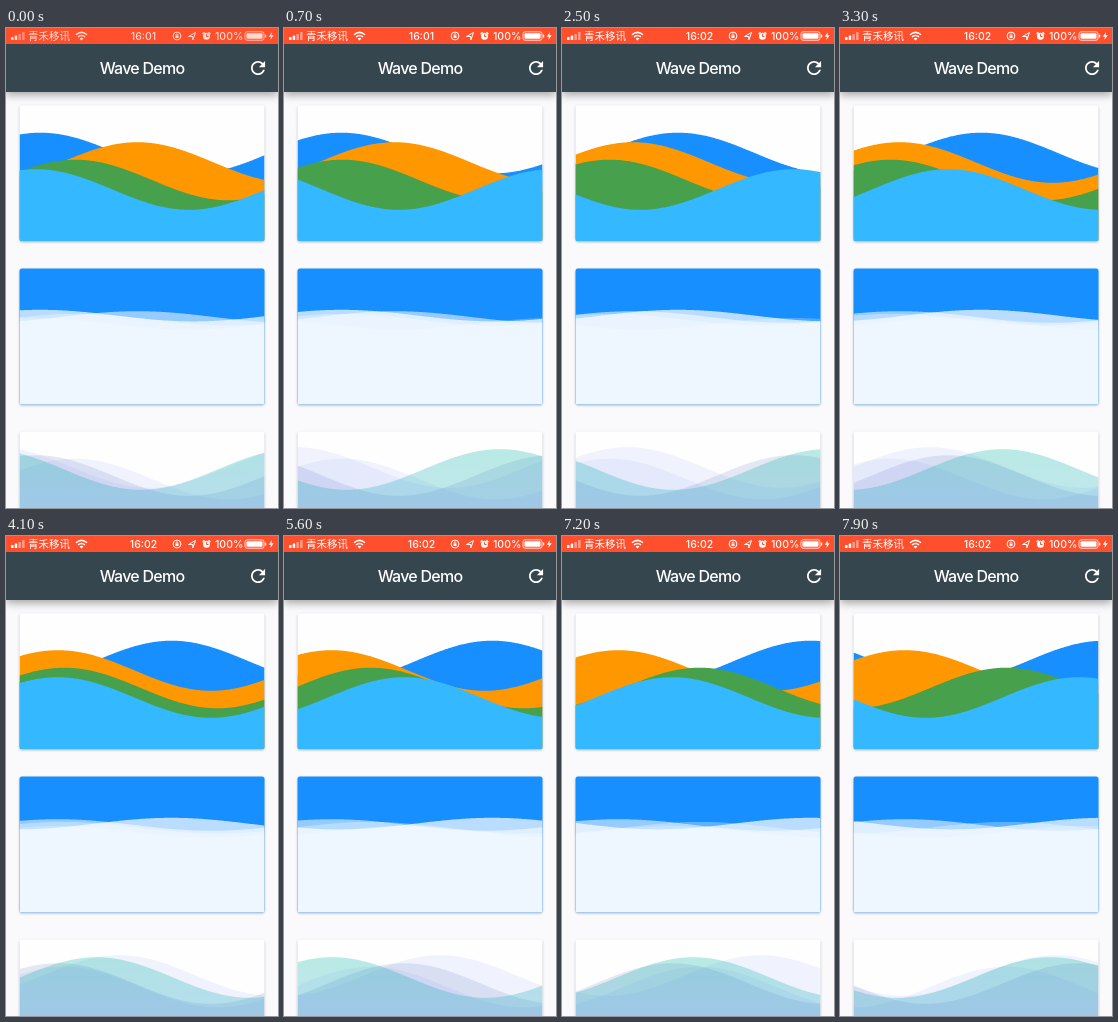
Recreate the animation shown at these times as an HTML page. Size 272 by 480 pixels, loop 8000 ms.

```html
<!DOCTYPE html>
<html lang="en">
<head>
<meta charset="utf-8">
<title>Wave Demo</title>
<style>
html, body { margin: 0; width: 100%; height: 100%; overflow: hidden; background: #fafafc; }
svg { display: block; width: 272px; height: 480px; }
text { fill: #fff; font: 500 10.5px Inter, Roboto, sans-serif; }
.carrier { font: 400 10.5px "Noto Sans CJK SC", "Noto Sans CJK", sans-serif; }
.title { font-size: 16px; letter-spacing: -.75px; }
.card { filter: drop-shadow(0 1px 1px rgba(0,0,0,.25)); }
.bar { filter: drop-shadow(0 3px 4px rgba(0,0,0,.35)); }
.line { fill: none; stroke: #fff; stroke-width: 1; }
</style>
</head>
<body>
<svg viewBox="0 0 272 480">
  <defs>
    <linearGradient id="teal" gradientUnits="userSpaceOnUse" x1="0" y1="422" x2="0" y2="476">
      <stop offset="0" stop-color="#00b4a0"/>
      <stop offset="1" stop-color="#1ea5c3"/>
    </linearGradient>
  </defs>
  <g id="cards"></g>
  <rect class="bar" width="272" height="64" fill="#36464f"/>
  <rect width="272" height="16" fill="#ff4f2c"/>
  <g id="status" fill="#fff">
    <rect x="5" y="9" width="2.5" height="3" rx=".5"/>
    <rect x="8.7" y="7.5" width="2.5" height="4.5" rx=".5"/>
    <rect x="12.4" y="6" width="2.5" height="6" rx=".5" opacity=".45"/>
    <rect x="16.1" y="4" width="2.5" height="8" rx=".5" opacity=".45"/>
    <text class="carrier" x="22" y="11.8">青禾移讯</text>
    <path class="line" style="stroke-width:1.5" d="M70 6.7Q75.500 2 81 6.700M72 8.800Q75.500 6 79 8.800"/>
    <path d="M73.600 10.400Q75.500 8.900 77.400 10.400L75.500 12.400Z"/>
    <text id="clock" x="137.500" y="11.800" text-anchor="middle"></text>
    <circle class="line" cx="171" cy="8" r="3.900"/>
    <rect x="169.500" y="7.500" width="3" height="2.500"/>
    <path class="line" style="stroke-width:.7" d="M170.200 7.500V6.500a.8.800 0 0 1 1.600 0V7.500"/>
    <path class="line" d="M182.500 8.500L189.500 4.500L186.800 12V8.500Z"/>
    <circle cx="200.500" cy="8.300" r="3.500"/>
    <path class="line" style="stroke-width:1.300" d="M196.500 6L198.500 4.200M204.500 6L202.500 4.200"/>
    <path class="line" style="stroke:#ff4f2c" d="M200.500 6.200V8.500H202.500"/>
    <text x="209" y="11.800">100%</text>
    <rect class="line" x="239" y="3.800" width="19" height="8.400" rx="2" style="stroke-width:.8"/>
    <rect x="240.500" y="5.300" width="16" height="5.400" rx="1"/>
    <rect x="259" y="6.500" width="1.200" height="3" rx=".6"/>
    <path d="M266 4L262.800 8.700H265L264.300 12L267.700 7.200H265.400Z"/>
  </g>
  <text class="title" x="136" y="46" text-anchor="middle">Wave Demo</text>
  <path transform="translate(241.500 29.500) scale(.88)" fill="#fff" d="M17.650 6.350C16.200 4.900 14.210 4 12 4c-4.420 0-7.990 3.580-7.990 8s3.570 8 7.990 8c3.730 0 6.840-2.550 7.730-6h-2.080c-.82 2.330-3.040 4-5.650 4-3.310 0-6-2.690-6-6s2.690-6 6-6c1.660 0 3.140.69 4.220 1.780L13 11h7V4z"/>
</svg>
<script>
const LEFT = 13.5, WIDTH = 245, HEIGHT = 136;
const LOOP = 8000, STEP = 100;
const ELAPSED = 15.6; // seconds the waves have run when the loop begins

// wave: [seconds per sweep, direction, centre y, fill, opacity], back to front
const cards = [
  { top: 77.3, back: '#fefefe', amp: 20.3, waves: [
    [32, -1, 125, '#188fff', 1],
    [21, 1, 134.5, '#ff9800', 1],
    [18, 1, 152, '#47a04b', 1],
    [5, -1, 161.5, '#34b8ff', 1]] },
  { top: 240.4, back: '#188fff', amp: 5.8, waves: [
    [32, -1, 287.6, '#fff', .7],
    [21, 1, 289, '#fff', .54],
    [18, 1, 291.7, '#fff', .3],
    [5, -1, 295.8, '#fff', .24]] },
  { top: 403.6, back: '#fefefe', amp: 20.3, waves: [
    [35, -1, 439.5, '#7896f5', .1],
    [18, 1, 451, '#7896f5', .1],
    [5, -1, 447.5, '#506ebe', .15],
    [7, 1, 441.5, 'url(#teal)', .27]] }
];

function add(parent, tag, attrs) {
  const el = document.createElementNS('http://www.w3.org/2000/svg', tag);
  for (const key in attrs) el.setAttribute(key, attrs[key]);
  return parent.appendChild(el);
}

const root = document.getElementById('cards');
cards.forEach((card, i) => {
  const box = { x: LEFT, y: card.top, width: WIDTH, height: HEIGHT, rx: 2.5 };
  add(add(root, 'clipPath', { id: 'clip' + i }), 'rect', box);
  add(root, 'rect', { ...box, fill: card.back, class: 'card' });
  const group = add(root, 'g', { 'clip-path': `url(#clip${i})` });
  card.paths = card.waves.map(([, , , fill, alpha]) =>
    add(group, 'path', { fill, 'fill-opacity': alpha }));
});

// cubic-bezier(.42, 0, .58, 1)
function ease(x) {
  let lo = 0, hi = 1, s = .5;
  for (let i = 0; i < 24; i++) {
    s = (lo + hi) / 2;
    const bx = 1.26 * s * (1 - s) ** 2 + 1.74 * s * s * (1 - s) + s ** 3;
    if (bx < x) lo = s; else hi = s;
  }
  return s * s * (3 - 2 * s);
}

// Each wave sweeps two full turns and back again.
function phase(sec, period, dir) {
  const u = ((ELAPSED + sec) / period) % 2;
  const e = ease(u < 1 ? u : 2 - u);
  return (230 + 720 * (dir > 0 ? e : 1 - e)) * Math.PI / 180;
}

function wavePath(centre, amp, start, bottom) {
  let d = `M${LEFT} ${bottom}`;
  for (let x = 0; x <= WIDTH; x++) {
    const y = centre + amp * Math.sin(1.6 * Math.PI * x / WIDTH + start);
    d += `L${LEFT + x} ${y.toFixed(2)}`;
  }
  return d + `V${bottom}Z`;
}

const clock = document.getElementById('clock');
const statusBar = document.getElementById('status');
const origin = performance.now();

function draw() {
  const elapsed = Math.max(0, performance.now() - origin) % LOOP;
  const ms = Math.floor(elapsed / STEP) * STEP;
  for (const card of cards)
    card.waves.forEach(([period, dir, centre], i) =>
      card.paths[i].setAttribute('d', wavePath(centre, card.amp,
        phase(ms / 1000, period, dir), card.top + HEIGHT)));
  clock.textContent = ms < 2000 ? '16:01' : '16:02';
  statusBar.setAttribute('opacity', ms < STEP ? .78 : 1);
  requestAnimationFrame(draw);
}
draw();
</script>
</body>
</html>
```
